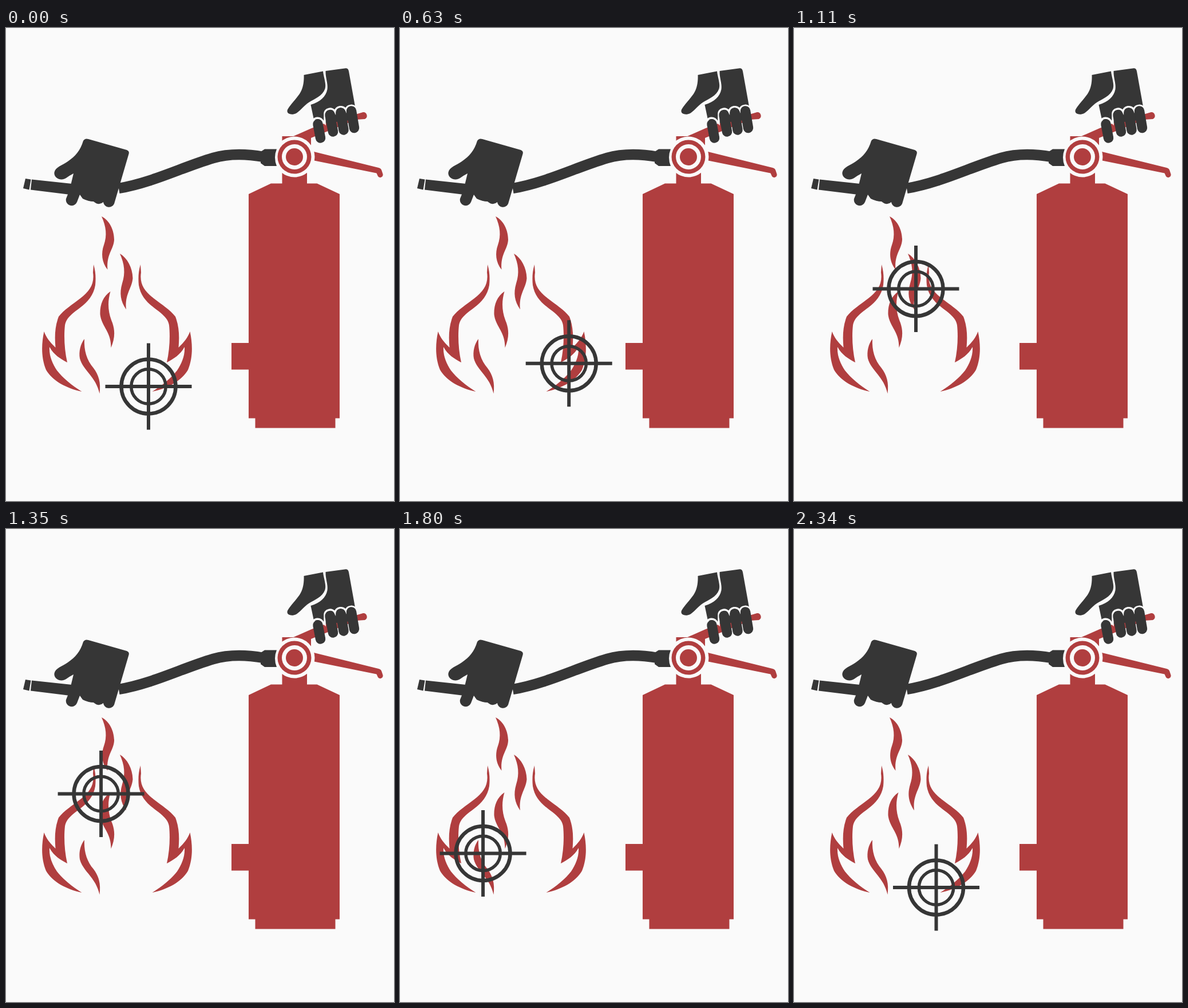
Animation of 678 by 826 pixels, one loop 3.42 s. Source, as an HTML page:

```html
<!DOCTYPE html>
<html lang="en">
<head>
<meta charset="utf-8">
<title>Aim at the base of the fire</title>
<style>
html, body { margin: 0; width: 100%; height: 100%; overflow: hidden; background: #fafafa; }
svg { display: block; width: 678px; height: 826px; }
.red { fill: #b03e3f; }
.dark { fill: #363636; }
.light { fill: #fafafa; }
.line { fill: none; stroke: #363636; }
.gap { fill: none; stroke: #fafafa; }
</style>
</head>
<body>
<svg viewBox="0 0 678 826">
  <defs>
    <path id="side" d="M153 413 C157 426 157 438 156 449 C153 467 143 478 130 488 C114 500 105 507 103 519 C101 538 102 562 107 584
      C94 577 84 571 76 557 C75 572 81 586 89 598 C99 611 115 624 132.500 635 C105 629 81 616 70 597 C61 575 62 551 66.500 530
      C70 540 77 549 86.500 558 C85 540 85 522 92 504 C101 492 116 483 130 472 C146 460 155 447 152 427 Z"/>
  </defs>

  <g class="red">
    <!-- cylinder -->
    <path d="M463 271.500 H543.500 L583 290 V681.500 H575.500 V698.500 H435.500 V681.500 H424 V596.500 H394 V550 H424 V290 Z"/>
    <path d="M482.500 189 H533 V230 H526 V273 H482.500 Z"/>
    <!-- levers -->
    <path d="M500 190 L534 175 Q545 171 556 167 L624 147 A6.300 6.300 0 0 1 627 159 L612 160 L533 192 Z"/>
    <path d="M536 215.500 L651 244 Q655.500 245 656.500 249 L658.500 255 A4.800 4.800 0 0 1 650 259 L647.500 253.500 L536 231 Z"/>
    <!-- flames -->
    <use href="#side"/>
    <use href="#side" transform="matrix(-1 0 0 1 388 0)"/>
    <path d="M167 329 C181 336 189 353 189 370 C188 387 175 395 177.500 422 C167 409 166 393 171 379 C177 362 175 347 167 329 Z"/>
    <path d="M199 394 C212 402 221 418 221.500 437 C220 455 207 465 210 491.500 C200 477 198 463 203 446 C209 428 207 412 199 394 Z"/>
    <path d="M182.500 460 C169 469 164 484 164.500 500 C167 522 184 530 183.500 558.500 C190 543 191 530 186 515 C178 496 177 479 182.500 460 Z"/>
    <path d="M137 543 C130 552 127 565 129 577 C135 599 157 608 163.500 638.500 C166 619 162 606 153 594 C141 580 136 563 137 543 Z"/>
  </g>

  <circle class="light" cx="504" cy="225" r="35.500"/>
  <circle class="red" cx="504" cy="225" r="29.500"/>
  <circle class="light" cx="504" cy="225" r="22"/>
  <circle class="red" cx="504" cy="225" r="15"/>

  <!-- hose -->
  <path class="line" stroke-width="18.500" d="M450 225 C416 219 386 220 362 227 C308 243 256 270 197 280"/>
  <path class="dark" d="M452 211.500 H473 Q467 226 473 241 H452 L445 236 V216 Z"/>
  <path class="dark" d="M45 264.500 L120 272.500 V292 L43 282.500 Z M34 263 L43.500 264.500 L40.500 282.500 L30 280 Z"/>

  <!-- hand on the hose -->
  <path class="dark" d="M135 197 Q138 192 144 194 L211 213 Q216 215 214.500 220 L194 290 L189 307 A10 10 0 0 1 170 304
    Q162 311 153 303 Q144 303 134 298 L129 291 L124 304 A10 10 0 0 1 105 298 L111 283 L118 254 Q112 257 105 262
    C96 268 83 262 84.500 252 C86 243 98 240 108 233 C121 224 130 214 135 197 Z"/>

  <!-- hand on the lever -->
  <path class="dark" d="M520.500 82 L554 75.500 C555 86 560 97 557.500 106 C553 119 540 123 529 130 C520 136 514 145 507 149
    C499 153 489 150 492 142.500 C496 135 506 125 513 115 C519 106 521 94 520.500 82 Z"/>
  <path class="dark" d="M558.500 75 L592 70.500 Q598 69.500 599 75.500 L609.500 134 L611 160 L560 166 L538 160 L532.500 134
    C549 129 559 120 561.500 107 C563 97 558 87 558.500 75 Z"/>
  <path class="gap" stroke-width="3.500" d="M535.500 169 V165 C536 156 549 154 554 163 L557 166 V151
    C556 140 571 138 575 146 C576 136 590 135 594 143 C595 133 610 133 613 142 L614.500 149"/>
  <g class="line" stroke-width="17.500" stroke-linecap="round">
    <path d="M545 168 L549.500 192"/>
    <path d="M566 152 L571.500 181"/>
    <path d="M585 148 L590 178"/>
    <path d="M603.500 145 L608.500 174.500"/>
  </g>

  <g id="aim" class="line">
    <circle r="47.500" stroke-width="6.500"/>
    <circle r="30.200" stroke-width="5.500"/>
    <path stroke-width="6" d="M-75.500 0 H75.500 M0 -75.500 V75.500"/>
  </g>
</svg>
<script>
const LOOP = 3420, STEP = 30;

// time, x, y
const stops = [
  [0, 249, 626], [200, 258.5, 625], [390, 281, 617], [540, 293.5, 603.5],
  [700, 292.5, 569], [870, 268, 522.5], [1110, 213, 455.5], [1320, 170.5, 459],
  [1560, 146, 505.5], [1690, 139.8, 540], [1860, 152, 579], [2040, 190, 607.5],
  [2160, 217.5, 619.5], [2340, 248.5, 626]
];
const aim = document.getElementById('aim');

function slope(i, axis) {
  if (i === 0 || i === stops.length - 1) return 0;
  const [a, b, c] = [stops[i - 1], stops[i], stops[i + 1]];
  const before = b[0] - a[0], after = c[0] - b[0];
  const v0 = (b[axis] - a[axis]) / before, v1 = (c[axis] - b[axis]) / after;
  return (v0 * after + v1 * before) / (before + after);
}

// cubic Hermite curve through the stops
function place(t, axis) {
  const i = stops.findIndex((s, n) => n > 0 && t < s[0]) - 1;
  if (i < 0) return stops[stops.length - 1][axis];
  const a = stops[i], b = stops[i + 1];
  const span = b[0] - a[0], u = (t - a[0]) / span, w = 1 - u;
  return a[axis] * (1 + 2 * u) * w * w + b[axis] * u * u * (3 - 2 * u)
    + span * u * w * (slope(i, axis) * w - slope(i + 1, axis) * u);
}

function draw(now) {
  const t = Math.floor(((now - start) % LOOP + LOOP) % LOOP / STEP) * STEP;
  aim.setAttribute('transform', `translate(${place(t, 1).toFixed(2)} ${place(t, 2).toFixed(2)})`);
}

function tick(now) {
  draw(now);
  requestAnimationFrame(tick);
}

const start = performance.now();
draw(start);
requestAnimationFrame(tick);
</script>
</body>
</html>
```
